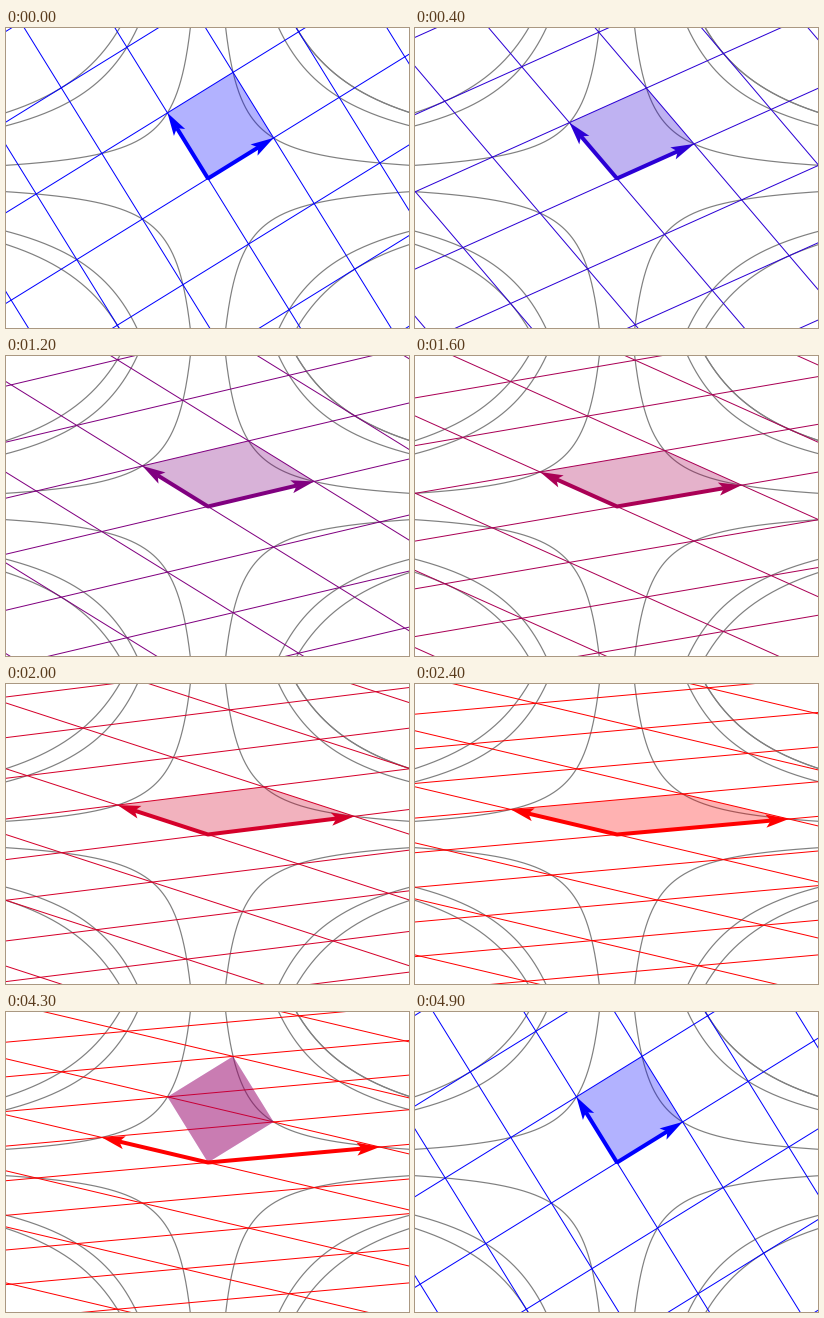
Animation of 403 by 300 pixels, one loop 5200 ms. Source, as a matplotlib script:

```python
import numpy as np
import matplotlib.pyplot as plt
from matplotlib.animation import FuncAnimation
from matplotlib.collections import LineCollection
from matplotlib.patches import Polygon

W, H, DPI = 403, 300, 64
CX, CY = 202, 150.5
PX = 72 / DPI                      # points per pixel
PHI = (1 + 5 ** 0.5) / 2
K = 40.55                          # lattice scale in pixels

FRAMES, INTERVAL = 52, 100
SQUEEZE_END = 24                   # squeeze finished
SQUARE_ON = 25                     # unit cell shown again
MOVE_START, MOVE_LEN = 29, 5       # three pieces slide home in turn
RESET = 49

BLUE, RED, GREY = (0, 0, 1), (1, 0, 0), (0.5, 0.5, 0.5)
ALPHA = 0.3

O = np.zeros(2)
u = K * np.array([PHI, 1])
v = K * np.array([-1, PHI])


def squeeze(p, s):
    f = PHI ** (2 * s)
    return p * [f, 1 / f]


U, V = squeeze(u, 1), squeeze(v, 1)

# (triangle, lattice shift) in order of movement; the first stays put
PIECES = [
    ([O, u, v / 2], O),
    ([u, U, U / 2], V),
    ([V, O, v / 2], u),
    ([O, U / 2, u], v),
]

fig = plt.figure(figsize=(W / DPI, H / DPI), dpi=DPI, facecolor="white")
ax = fig.add_axes([0, 0, 1, 1])
ax.set_xlim(-CX, W - CX)
ax.set_ylim(CY - H, CY)
ax.axis("off")


def hyperbola(level, sx, sy):
    c = level * PHI * K ** 2
    x = np.geomspace(c / 260, 260, 200)
    ax.plot(sx * x, sy * c / x, color=GREY, lw=1.2 * PX, zorder=1)


for level in (1, 4, 5):
    for sx in (1, -1):
        for sy in (1, -1):
            hyperbola(level, sx, sy)
hyperbola(5, 1, 1)

grid = ax.add_collection(LineCollection([], linewidths=1.0 * PX, zorder=2),
                         autolim=False)


def add_fill(color, z):
    p = Polygon([O, O, O], closed=True, facecolor=color, edgecolor="none",
                lw=0, alpha=ALPHA, zorder=z)
    return ax.add_patch(p)


square = add_fill(BLUE, 3)
square.set_xy([O, u, u + v, v])
cell = add_fill(BLUE, 4)
parts = [add_fill(RED, 4) for _ in PIECES]

shaft, = ax.plot([], [], lw=4 * PX, solid_capstyle="butt",
                 solid_joinstyle="bevel", zorder=5)
heads = [ax.add_patch(Polygon([O, O, O], closed=True, lw=0, zorder=6))
         for _ in range(2)]


def lattice(a, b):
    segs = []
    for d, step in ((a, b), (b, a)):
        far = d / np.hypot(*d) * 900
        segs += [(n * step - far, n * step + far) for n in range(-9, 10)]
    return segs


def head_shape(tip):
    d = tip / np.hypot(*tip)
    n = np.array([-d[1], d[0]])
    back = tip - 23 * d
    return [tip, back + 6.6 * n, tip - 18 * d, back - 6.6 * n]


def draw(i):
    if i >= RESET:
        i = 0
    s = min(i / SQUEEZE_END, 1)
    color = (s, 0, 1 - s)
    a, b = squeeze(u, s), squeeze(v, s)

    grid.set_segments(lattice(a, b))
    grid.set_color([color])

    tips = [p * (1 - 18 / np.hypot(*p)) for p in (a, b)]
    shaft.set_data(*np.array([tips[0], O, tips[1]]).T)
    shaft.set_color(color)
    for head, p in zip(heads, (a, b)):
        head.set_xy(head_shape(p))
        head.set_facecolor(color)

    moving = i >= MOVE_START
    cell.set_xy([O, a, a + b, b])
    cell.set_facecolor(color)
    cell.set_visible(not moving)
    square.set_visible(i >= SQUARE_ON)

    for k, (part, (tri, shift)) in enumerate(zip(parts, PIECES)):
        begun = i - MOVE_START + 1 - (k - 1) * MOVE_LEN
        t = np.clip(begun / MOVE_LEN, 0, 1)
        part.set_xy([p + t * shift for p in tri])
        part.set_visible(moving)
    return [grid, square, cell, *parts, shaft, *heads]


anim = FuncAnimation(fig, draw, frames=FRAMES, interval=INTERVAL,
                     init_func=lambda: draw(0), repeat=True, repeat_delay=0)
plt.show()
```
